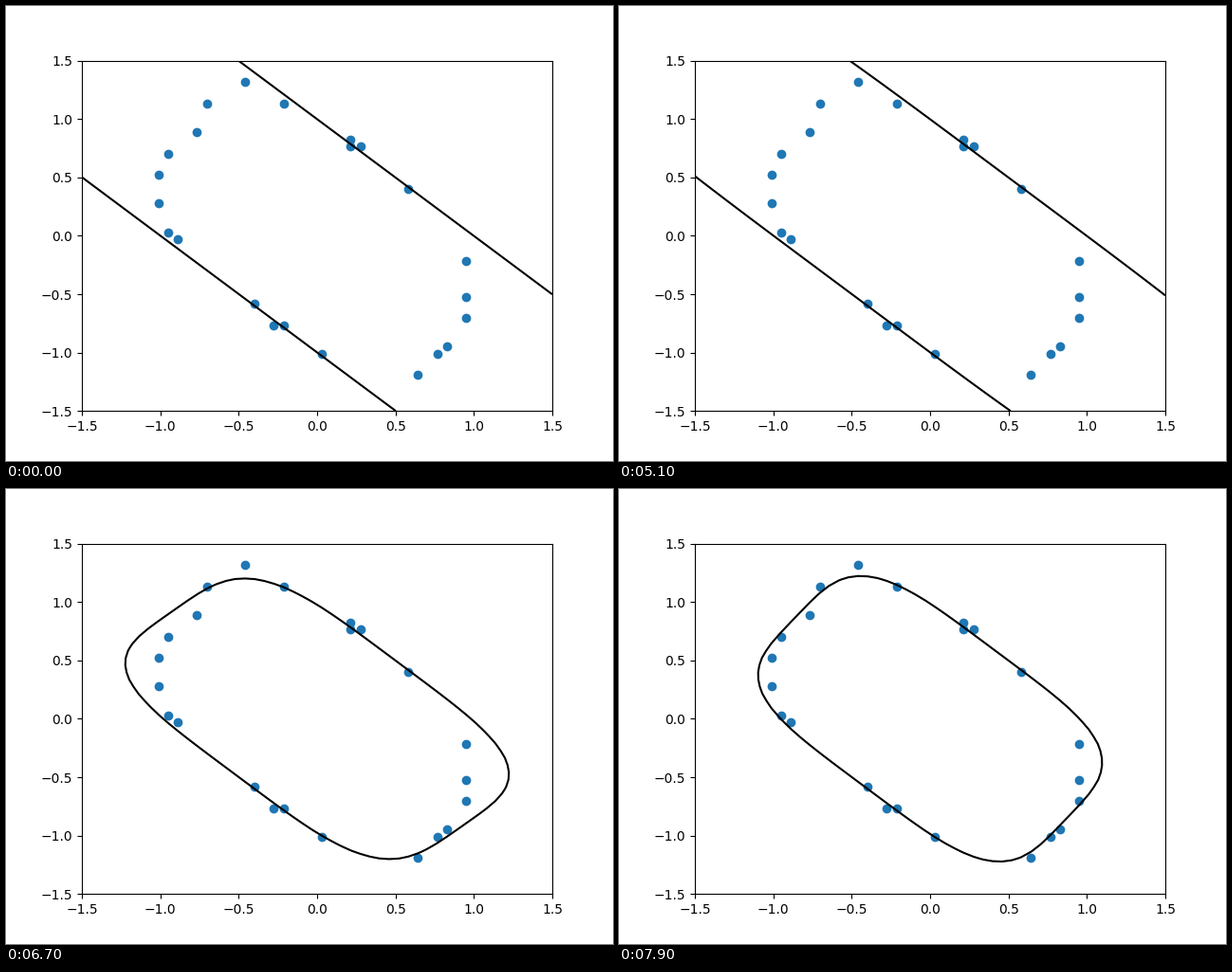
Animation, 640 px wide and 480 px high, one loop 8000 ms. Source, as a matplotlib script:

```python
import numpy as np
import matplotlib.pyplot as plt
from matplotlib.animation import FuncAnimation

INTERVAL = 100   # ms
FRAMES = 80
STEPS = FRAMES // 2
RATE = 0.0325
LIMIT = 1.5

axis = np.linspace(-LIMIT, LIMIT, 50)
X, Y = np.meshgrid(axis, axis)

# Sampled grid nodes (column, row), going round the shape
nodes = np.array([
    (17, 46), (13, 43), (21, 43), (12, 39), (9, 36), (8, 33), (8, 29),
    (9, 25), (10, 24), (28, 38), (28, 37), (29, 37), (34, 31), (18, 15),
    (20, 12), (21, 12), (25, 8), (40, 21), (40, 16), (40, 13), (38, 9),
    (37, 8), (35, 5),
])
px, py = axis[nodes].T


def quartic(x, y, w):
    """The curve is the level 1 of a fixed strip plus a learned one."""
    return (x + y) ** 4 + (w[0] * x + w[1] * y) ** 4


def descend(w):
    """One gradient step of the squared error at the points."""
    pull = (1 - quartic(px, py, w)) * (w[0] * px + w[1] * py) ** 3
    return w + RATE * np.array([pull @ px, pull @ py])


path = [np.array([0.103, -0.1128])]
for _ in range(STEPS):
    path.append(descend(path[-1]))

fig, ax = plt.subplots(figsize=(6.4, 4.8), dpi=100)
ax.scatter(px, py)
ax.set(xlim=(-LIMIT, LIMIT), ylim=(-LIMIT, LIMIT))
curves = []


def draw(frame):
    while curves:
        curves.pop().remove()
    w = path[(frame + 1) // 2]
    curves.append(ax.contour(X, Y, quartic(X, Y, w), levels=[1],
                             colors="black"))
    return curves


anim = FuncAnimation(fig, draw, frames=FRAMES, init_func=lambda: draw(0),
                     interval=INTERVAL, repeat=True, repeat_delay=0)
plt.show()
```
